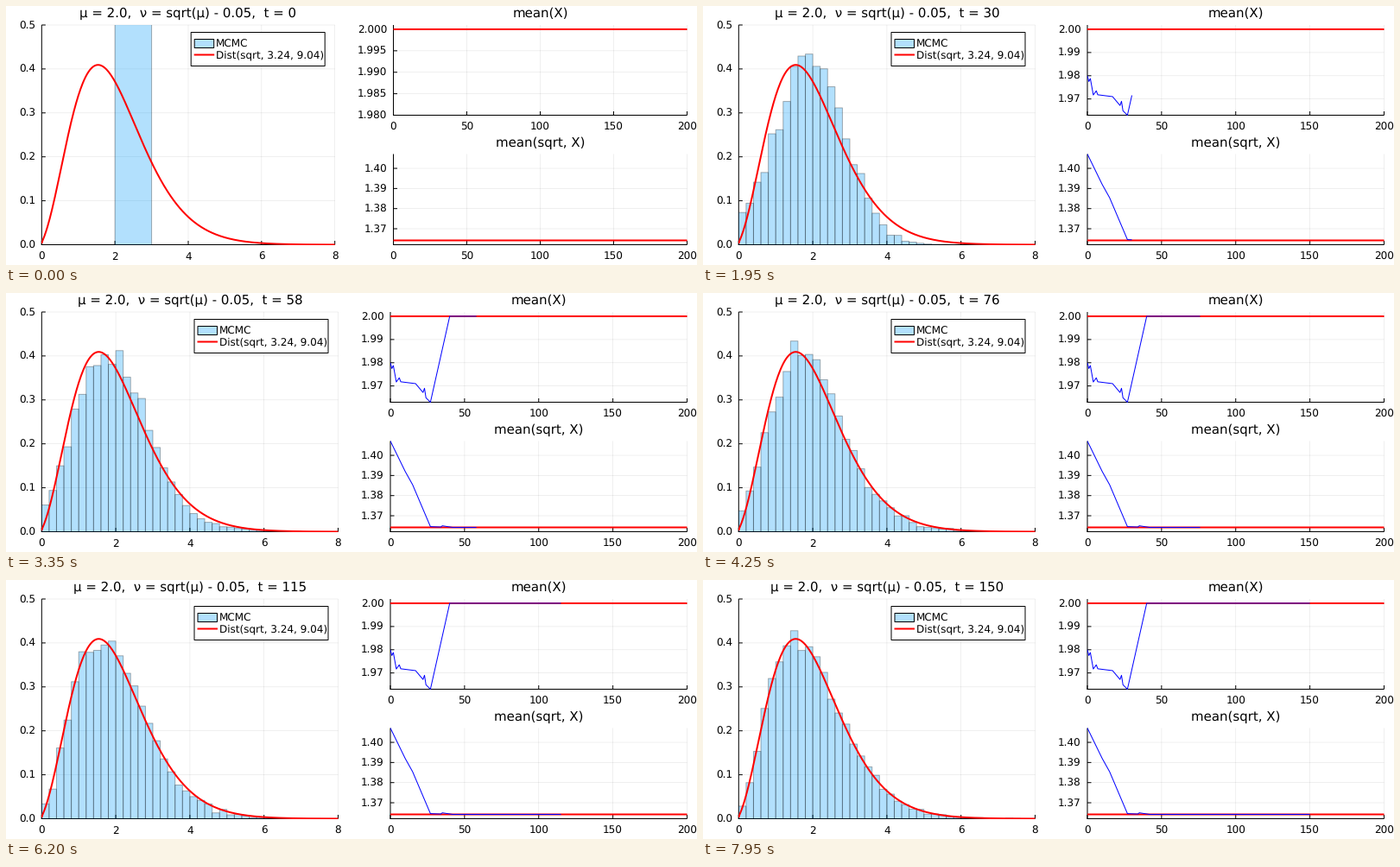
Animation of 800x300 px, one loop 8000 ms. Source, as a matplotlib script:

```python
import numpy as np
import matplotlib.pyplot as plt
from matplotlib.animation import FuncAnimation
from matplotlib.collections import PolyCollection
from matplotlib.patches import Rectangle
from matplotlib.transforms import Bbox, TransformedBbox

W, H, DPI = 800, 300, 100
PX = 72 / DPI
STEPS, HOLD, SAMPLES = 150, 9, 10000
MU, NU = 2.0, np.sqrt(2) - 0.05
BLUE_FILL = (0, 154 / 255, 250 / 255, 0.3)
GRID = (0, 0, 0, 0.1)

plt.rcParams.update({
    "font.family": "DejaVu Sans",
    "text.hinting": "none",
    "path.snap": False,
})
fig = plt.figure(figsize=(W / DPI, H / DPI), dpi=DPI, facecolor="white")
ax = fig.add_axes([0, 0, 1, 1])


# ---- limiting density exp(b*sqrt(x) - a*x), scaled to unit area
def raw(x):
    return np.exp(8.04 * np.sqrt(x) - 3.24 * x)


fine = np.linspace(0, 20, 20001)
AREA = raw(fine).sum() * (fine[1] - fine[0])


def limit(x):
    return raw(x) / AREA


def spread(x, t):
    """Gaussian random walk, reflected at zero."""
    m, s = 1.972, 0.1663 * np.sqrt(t)
    bell = np.exp(-((x - m) / s) ** 2 / 2) + np.exp(-((x + m) / s) ** 2 / 2)
    return bell / (s * np.sqrt(2 * np.pi))


def density(x, t):
    """Free diffusion up to t = 30, then decay to the limit."""
    if t <= 30:
        return spread(x, t)
    k = np.exp(-(t - 30) / 40)
    return k * spread(x, 30) + (1 - k) * limit(x)


# ---- running means through a few key points
steps = np.arange(STEPS + 1)
mean_x = np.interp(
    steps,
    [0, 1, 2, 4, 6, 7, 17, 22, 23, 24, 27, 40],
    [1.98, 1.9775, 1.9788, 1.9717, 1.9735, 1.9718, 1.971, 1.9672, 1.969,
     1.9649, 1.963, MU])
mean_s = np.interp(
    steps,
    [0, 10, 15, 21, 27, 34, 35, 42],
    [1.4071, 1.392, 1.3854, 1.375, 1.3646, 1.3644, 1.365, NU])

# ---- sampling noise of the bars, carried over in part from step to step
rng = np.random.default_rng(7)
noise = rng.normal(size=(STEPS + 1, 400))
for i in range(1, STEPS + 1):
    noise[i] = 0.6 * noise[i - 1] + 0.8 * noise[i]


def bin_width(t):
    """Freedman-Diaconis width, rounded to a 1-2-5 step."""
    wide = 2 * 1.349 * 0.1663 * np.sqrt(min(t, 32)) / SAMPLES ** (1 / 3)
    size = 10 ** np.floor(np.log10(wide))
    for top, step in ((1.1, 1), (2.2, 2), (5.6, 5)):
        if wide / size <= top:
            return step * size
    return 10 * size


def heights(t):
    w = bin_width(t)
    left = np.arange(round(8 / w)) * w
    p = density(left + w / 2, t)
    h = p + noise[t, :len(p)] * np.sqrt(p / (SAMPLES * w))
    return left, w, np.where(h > 0.0006, h, 0)


# ---- drawing in stage pixels
class Panel:
    def __init__(self, box, xlim, ylim):
        self.box, self.xlim, self.ylim = box, xlim, ylim
        l, t, r, b = box
        self.clip = TransformedBbox(
            Bbox.from_extents(l - 0.5, b + 0.5, r + 0.5, t - 0.5), ax.transData)

    def x(self, v):
        l, _, r, _ = self.box
        return l + (v - self.xlim[0]) / (self.xlim[1] - self.xlim[0]) * (r - l)

    def y(self, v):
        _, t, _, b = self.box
        return b - (v - self.ylim[0]) / (self.ylim[1] - self.ylim[0]) * (b - t)

    def frame(self, title, xticks, yticks, fmt):
        l, t, r, b = self.box
        for v in xticks:
            stroke([self.x(v)] * 2, [t, b], GRID, 0.6)
        for v in yticks:
            stroke([l, r], [self.y(v)] * 2, GRID, 0.6)
        stroke([l - 0.5, r], [b, b])
        stroke([l, l], [t, b])
        for v in xticks:
            stroke([self.x(v)] * 2, [b, b - 4.5])
            label(self.x(v), b + 17.5, str(v), "center")
        for v in yticks:
            stroke([l, l + 4.5], [self.y(v)] * 2)
            label(l - 7.5, self.y(v) + 4.4, fmt % v, "right")
        label((l + r) / 2, t - 8.7, title, "center", 15)

    def plot(self, x, y, color, width):
        line = stroke(self.x(np.asarray(x)), self.y(np.asarray(y)), color, width)
        line.set_clip_box(self.clip)

    def bars(self, left, w, h):
        polys = [[(self.x(a), self.y(0)), (self.x(a), self.y(v)),
                  (self.x(a + w), self.y(v)), (self.x(a + w), self.y(0))]
                 for a, v in zip(left, h) if v > 0]
        group = PolyCollection(polys, facecolors=[BLUE_FILL], zorder=2,
                               edgecolors=[(0, 0, 0, 0.3)], linewidths=PX)
        ax.add_collection(group, autolim=False)
        group.set_clip_box(self.clip)


def stroke(x, y, color="black", width=1):
    return ax.plot(x, y, color=color, lw=width * PX, zorder=2,
                   solid_capstyle="butt", solid_joinstyle="round")[0]


def label(x, y, text, ha="left", size=12):
    ax.text(x, y, text, ha=ha, va="baseline", fontsize=size * PX, zorder=5)


def legend(x, y):
    ax.add_patch(Rectangle((x, y), 155, 39, fc="white", ec="black",
                           lw=PX, zorder=3))
    ax.add_patch(Rectangle((x + 4, y + 8), 22.5, 10, fc=BLUE_FILL, ec="black",
                           lw=PX, zorder=4))
    stroke([x + 3.5, x + 27], [y + 26] * 2, "red", 2).set_zorder(4)
    label(x + 28.8, y + 17.6, "MCMC")
    label(x + 28.8, y + 30.4, "Dist(sqrt, 3.24, 9.04)")


curve_x = np.linspace(0, 8, 401)
curve_y = limit(curve_x)


def draw(k):
    t = max(0, k - HOLD)
    ax.cla()
    ax.set_xlim(0, W)
    ax.set_ylim(H, 0)
    ax.axis("off")

    low = mean_x[:t + 1].min()
    coarse = low < 1.97
    right, left = (384.5, 445) if coarse else (380.7, 448.5)

    main = Panel((41.3, 22, right, 276.5), (0, 8), (0, 0.5))
    main.frame("μ = 2.0,  ν = sqrt(μ) - 0.05,  t = %d" % t,
               range(0, 9, 2), np.arange(6) / 10, "%.1f")
    if t:
        main.bars(*heights(t))
    else:
        main.bars([2], 1, [1])
    main.plot(curve_x, curve_y, "red", 2)
    legend(right - 166.5, 30.5)

    step = 0.01 if coarse else 0.005
    ticks = [MU - step * i for i in range(7) if MU - step * i >= low - 1e-9]
    top = Panel((left, 22, 788.5, 126.5), (0, 200), (low, MU + 0.05 * (MU - low)))
    top.frame("mean(X)", range(0, 201, 50), ticks[::-1],
              "%.2f" if coarse else "%.3f")

    high = mean_s[0]
    bottom = Panel((left, 171.5, 788.5, 276.5), (0, 200),
                   (NU - 0.05 * (high - NU), high))
    bottom.frame("mean(sqrt, X)", range(0, 201, 50),
                 [1.37, 1.38, 1.39, 1.40], "%.2f")

    for panel, goal, trace in ((top, MU, mean_x), (bottom, NU, mean_s)):
        panel.plot([0, 200], [goal, goal], "red", 2)
        if t:
            panel.plot(steps[:t + 1], trace[:t + 1], "blue", 1)
    return []


anim = FuncAnimation(fig, draw, frames=STEPS + HOLD + 1, interval=50,
                     init_func=lambda: draw(0), repeat=True, repeat_delay=0,
                     blit=False)
plt.show()
```
